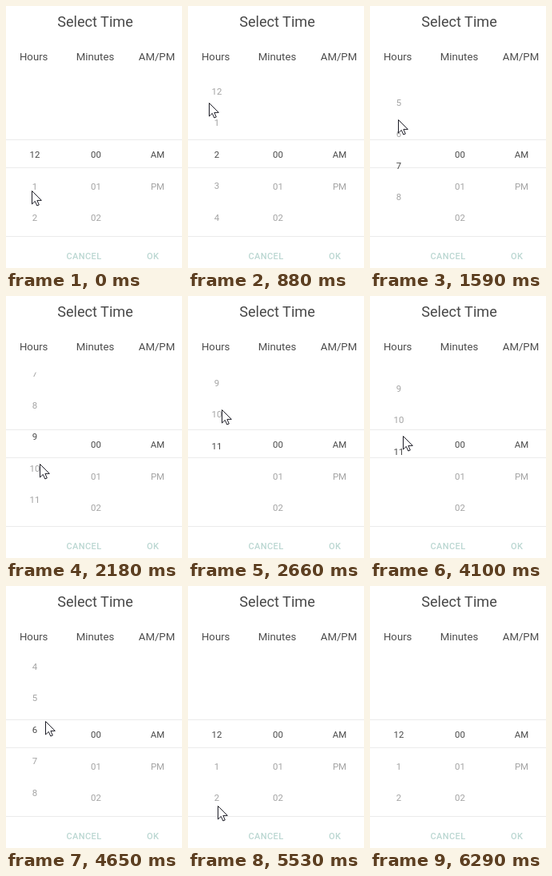
These frames come from a looping animation (220 by 328 pixels, 6910 ms). An HTML page:

```html
<!DOCTYPE html>
<html lang="en">
<head>
<meta charset="utf-8">
<title>Select Time</title>
<style>
  html, body { margin: 0; width: 100%; height: 100%; overflow: hidden; background: #fff; }
  svg { display: block; width: 220px; height: 328px; }
  text { font: 11.4px Roboto, sans-serif; text-anchor: middle; fill: #a3a3a3; }
  .title { font-size: 18.1px; fill: #484848; }
  .head { font-size: 13.2px; fill: #4c4c4c; }
  .chosen { fill: #484848; }
  .button { font-size: 11px; font-weight: 500; letter-spacing: .4px; fill: #bbd7d2; }
  .rule { stroke: #ebebeb; }
</style>
</head>
<body>
<svg viewBox="0 0 220 328">
  <defs><clipPath id="wheel"><rect y="95.5" width="220" height="179"/></clipPath></defs>
  <path class="rule" d="M0 167.5H220M0 202.5H220M0 288.5H220"/>
  <text class="title" x="111.5" y="26">Select Time</text>
  <text class="head" x="34.7" y="68">Hours</text>
  <text class="head" x="111.5" y="68">Minutes</text>
  <text class="head" x="188.5" y="68">AM/PM</text>
  <g id="hours" clip-path="url(#wheel)"></g>
  <text class="chosen" x="112.5" y="190">00</text>
  <text x="112.5" y="230">01</text>
  <text x="112.5" y="269">02</text>
  <text class="chosen" x="189.5" y="190">AM</text>
  <text x="189.5" y="230">PM</text>
  <text class="button" x="97.5" y="317">CANCEL</text>
  <text class="button" x="183.7" y="317">OK</text>
  <path id="cursor" d="M.5 .5V17L4.3 13.4L6.8 19L9.3 18L6.9 12.4H12.3Z" fill="#fff" stroke="#1c1c26"/>
</svg>
<script>
const LOOP = 6910, CURSOR_GONE = 6290, ROW = 39.5, BASELINE = 190;

// Wheel: three drags forward to 11, two back to 12
const glides = [
  { start: 570, end: 1190, to: 4 },
  { start: 1230, end: 1925, to: 9 },
  { start: 2030, end: 2720, to: 11 },
  { start: 4010, end: 4727, to: 6 },
  { start: 4727, end: 5530, to: 0 }
];

// Pointer: pulls along with each drag and swings back for the next
const swings = [
  { start: 160, end: 410, x: 36, y: 237 },
  { start: 570, end: 940, x: 25, y: 112 },
  { start: 940, end: 1290, x: 34, y: 241 },
  { start: 1290, end: 1728, x: 35, y: 112 },
  { start: 1728, end: 2030, x: 42, y: 218 },
  { start: 2030, end: 2870, x: 42, y: 128 },
  { start: 3420, end: 3430, x: 40, y: 120 },
  { start: 3580, end: 3850, x: 39, y: 140 },
  { start: 4010, end: 4320, x: 48, y: 310 },
  { start: 4320, end: 4837, x: 49, y: 110 },
  { start: 4837, end: 5530, x: 37, y: 275 },
  { start: 5930, end: 6290, x: 77, y: 227 }
];

const cursor = document.getElementById('cursor');
const wheel = document.getElementById('hours');
const hours = Array.from({ length: 12 }, (_, i) => {
  const label = document.createElementNS('http://www.w3.org/2000/svg', 'text');
  label.textContent = i || 12;
  label.setAttribute('x', 36);
  return wheel.appendChild(label);
});

function ease(time, start, end) {
  const p = Math.min(1, Math.max(0, (time - start) / (end - start)));
  return p * p * (3 - 2 * p);
}

// Runs a value through its moves, each easing on from where the last one ended
const follow = (moves, key, from, time) => moves.reduce(
  (value, move) => value + (move[key] - value) * ease(time, move.start, move.end), from);

function draw(time) {
  const scroll = follow(glides, 'to', 0, time);
  hours.forEach((label, i) => {
    label.setAttribute('y', Math.round(BASELINE + (i - scroll) * ROW));
    label.classList.toggle('chosen', i === Math.round(scroll));
  });
  const x = Math.round(follow(swings, 'x', 32, time));
  const y = Math.round(follow(swings, 'y', 231, time));
  cursor.setAttribute('transform', `translate(${x} ${y})`);
  cursor.style.visibility = time < CURSOR_GONE ? 'visible' : 'hidden';
}

const start = performance.now();
function tick() {
  draw((performance.now() - start) % LOOP);
  requestAnimationFrame(tick);
}
tick();
</script>
</body>
</html>
```
